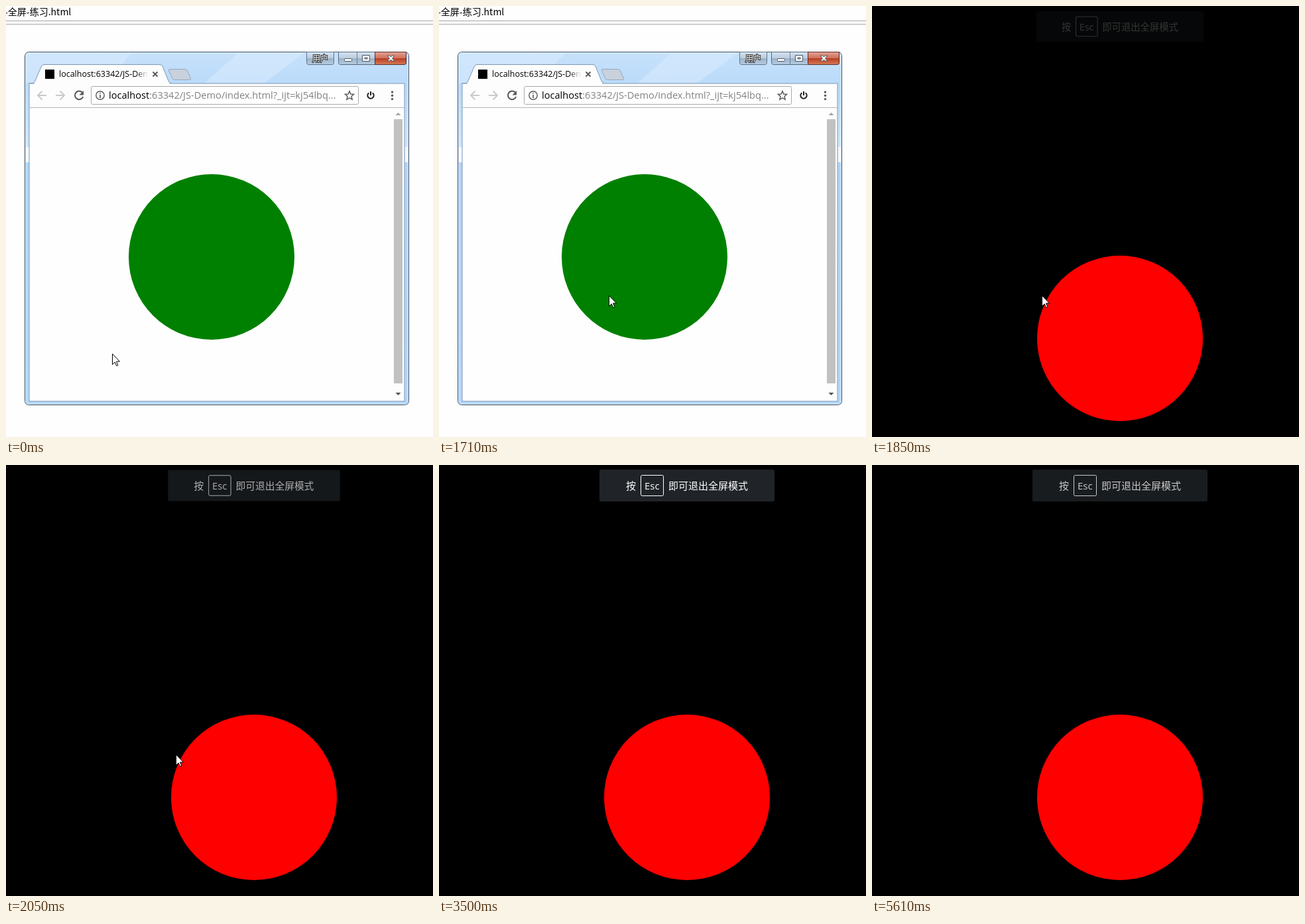
These frames come from a looping animation (644 px wide and 651 px high, 5710 ms). An HTML page:

```html
<!DOCTYPE html>
<html lang="zh">
<head>
<meta charset="utf-8">
<title>全屏</title>
<style>
  html, body { margin: 0; width: 100%; height: 100%; overflow: hidden; background: #000; }
  svg { display: block; width: 644px; height: 651px; }
  text { font-family: "Open Sans", "Noto Sans CJK SC", "Noto Sans CJK", sans-serif; white-space: pre; }
  .cjk { font-family: "Noto Sans CJK SC", "Noto Sans CJK", sans-serif; }
  .bar { fill: #fdfdfd; }
  .edge { stroke: #7d97b3; }
  .newtab { fill: #c8d1dc; stroke: #98a8ba; }
  .profile { fill: url(#button); stroke: #5f7388; }
  .bare .glass { display: none; }
  .bare .bar { fill: #f1f1f1; }
  .bare .edge { stroke: none; }
  .bare .newtab { fill: #a2a2a2; stroke: none; }
  .bare .profile { fill: url(#darkButton); stroke: #b5b5b5; }
</style>
</head>
<body>
<svg viewBox="0 0 644 651">
  <defs>
    <linearGradient id="frame" x2="0" y2="1">
      <stop stop-color="#c6e1fb"/><stop offset=".1" stop-color="#b9dafa"/>
      <stop offset=".31" stop-color="#d5e9fc"/><stop offset=".312" stop-color="#b2d5f8"/>
      <stop offset="1" stop-color="#b4d8fc"/>
    </linearGradient>
    <linearGradient id="button" x2="0" y2="1">
      <stop stop-color="#d5e3f1"/><stop offset=".48" stop-color="#bccddf"/>
      <stop offset=".5" stop-color="#9bb0c6"/><stop offset="1" stop-color="#b7cde2"/>
    </linearGradient>
    <linearGradient id="darkButton" x2="0" y2="1">
      <stop stop-color="#666"/><stop offset=".48" stop-color="#383838"/>
      <stop offset=".5" stop-color="#050505"/><stop offset="1" stop-color="#333"/>
    </linearGradient>
    <linearGradient id="close" x2="0" y2="1">
      <stop stop-color="#e3a394"/><stop offset=".48" stop-color="#cf705c"/>
      <stop offset=".5" stop-color="#b83a22"/><stop offset="1" stop-color="#d57b58"/>
    </linearGradient>
    <linearGradient id="fade">
      <stop offset=".5" stop-color="#fff"/><stop offset="1" stop-color="#fff" stop-opacity="0"/>
    </linearGradient>
    <mask id="tabFade" maskUnits="userSpaceOnUse" x="78" y="90" width="136" height="26">
      <rect x="0" y="90" width="196" height="26" fill="#fff"/>
      <rect x="178" y="90" width="36" height="26" fill="url(#fade)"/>
    </mask>
  </defs>

  <g id="desktop">
    <rect width="644" height="651" fill="#fefefe"/>
    <path d="M0 22.5H644M0 27.5H644" stroke="#a5a5a5"/>
    <text class="cjk" x="-2" y="14" font-size="14">-全屏-练习.html</text>
  </g>

  <g id="browser">
    <g class="glass">
      <rect x="28.5" y="69.5" width="579" height="533" rx="6" fill="url(#frame)" stroke="#3d4d61"/>
      <path d="M30 116V76Q30 71 35 71H190L150 116ZM300 116L350 71H450L390 116Z" fill="#d9ecfe" opacity=".6"/>
      <path d="M30 213H35V236H30ZM602 213H606V236H602Z" fill="#f4f9fe"/>
      <rect x="29.5" y="70.5" width="577" height="531" rx="5" fill="none" stroke="#e4f2ff" opacity=".8"/>
      <path d="M501.500 69.500H603.500V85.500Q603.500 88.500 600.500 88.500H504.500Q501.500 88.500 501.500 85.500Z" fill="url(#button)" stroke="#54677c"/>
      <path d="M556.500 69.500H603.500V85.500Q603.500 88.500 600.500 88.500H556.500Z" fill="url(#close)" stroke="#5b3030"/>
      <path d="M529.500 70V88" stroke="#6a7e93"/>
      <g fill="#fff" stroke="#4b5664">
        <rect x="510.500" y="79.500" width="11" height="4" rx="1"/>
        <path fill-rule="evenodd" d="M537.500 74.500H548.500V83.500H537.500ZM541 78V80H545V78Z"/>
        <path d="M575 75H578.500L580.500 77 582.500 75H586L582.500 79 586 83H582.500L580.500 81 578.500 83H575L578.500 79Z"/>
      </g>
    </g>
    <path class="profile" d="M453.500 69.500H494.500V85.500Q494.500 88.500 491.500 88.500H456.500Q453.500 88.500 453.500 85.500Z"/>
    <text class="cjk" x="462" y="84" font-size="12" fill="#fff" stroke="#333" stroke-width="2" paint-order="stroke">用户</text>

    <rect class="bar edge" x="35" y="117" width="566" height="480" stroke-width="1"/>
    <path class="bar edge" d="M35 116.500H41Q43 116 44 113L53 92Q54.500 88.500 57 88.500H232Q235 88.500 236 91L245 113Q246 116.500 249 116.500"/>
    <path class="bar" d="M43 116H246V119H43Z"/>
    <path class="newtab" d="M247 95.500H270Q272.500 95.500 273.500 98L278.500 109Q279 111.500 277 111.500H254Q252 111.500 251 109.500L245.500 98Q245 95.500 247 95.500Z"/>
    <rect x="59" y="96" width="14" height="14"/>
    <text x="80" y="107" font-size="12.5" mask="url(#tabFade)">localhost:63342/JS-Demo</text>
    <path d="M221.500 99.500L228.500 106.500M228.500 99.500L221.500 106.500" stroke="#555" stroke-width="1.8"/>

    <g fill="none" stroke="#cacaca" stroke-width="2">
      <path d="M61 135H48.500M54.500 128.500L48 135 54.500 141.500M75 135H87.500M81.500 128.500L88 135 81.500 141.500"/>
      <path d="M114.700 130.300A6.300 6.300 0 1 0 116.200 137" stroke="#555"/>
    </g>
    <path d="M117 128V134.500H110.500Z" fill="#555"/>
    <rect x="128.500" y="121.500" width="403" height="27" rx="2" fill="#fff" stroke="#a9a9a9"/>
    <circle cx="142" cy="135" r="6.200" fill="none" stroke="#555" stroke-width="1.400"/>
    <path d="M142 134V139M142 131V132.600" stroke="#555" stroke-width="1.600"/>
    <text x="155" y="140" font-size="14.6">localhost<tspan fill="#808080">:63342/JS-Demo/index.html?_ijt=kj54lbq...</tspan></text>
    <path d="M518 128.500L519.900 133 524.600 133.400 521 136.500 522.100 141.200 518 138.700 513.900 141.200 515 136.500 511.400 133.400 516.100 133Z" fill="none" stroke="#555" stroke-width="1.400"/>
    <path d="M547.300 131.200A4.700 4.700 0 1 0 552.700 131.200M550 129V135" fill="none" stroke="#222" stroke-width="2"/>
    <g fill="#555"><circle cx="582.500" cy="130" r="1.700"/><circle cx="582.500" cy="135.300" r="1.700"/><circle cx="582.500" cy="140.600" r="1.700"/></g>

    <path d="M36 153.500H601" stroke="#b5b5b5"/>
    <rect x="36" y="154" width="547" height="442" fill="#fefefe"/>
    <rect x="585" y="171" width="13" height="399" fill="#c1c1c1"/>
    <path d="M587.500 165H595.500L591.500 161Z" fill="#a3a3a3"/>
    <path d="M587.500 584H595.500L591.500 588Z" fill="#505050"/>
    <circle cx="310" cy="379" r="125" fill="#008000"/>
  </g>

  <g id="full">
    <rect width="644" height="651"/>
    <circle cx="374" cy="502" r="125" fill="#f00"/>
    <g id="notice">
      <rect x="242" y="7" width="264" height="48" rx="2" fill="#202428"/>
      <rect x="304.500" y="15.500" width="34" height="31" rx="2" fill="none" stroke="#fff"/>
      <g fill="#fff" font-size="15">
        <text class="cjk" x="282" y="37">按</text>
        <text x="310" y="37">Esc</text>
        <text class="cjk" x="346" y="37">即可退出全屏模式</text>
      </g>
    </g>
  </g>

  <g id="pointer">
    <path d="M.5.500V16.500L4.200 13 6.700 18.500 8.900 17.600 6.500 12H11.500Z" fill="#fff" stroke="#000"/>
    <g id="press" fill="none">
      <circle cx="1.500" cy="1.500" r="10" stroke="#000"/>
      <circle cx="1.500" cy="1.500" r="9" stroke="#fff"/>
    </g>
  </g>
</svg>
<script>
const LOOP = 5710;
const [desktop, browser, full, notice, pointer, press] =
  ['desktop', 'browser', 'full', 'notice', 'pointer', 'press'].map(id => document.getElementById(id));
const show = (el, on) => el.setAttribute('display', on ? 'inline' : 'none');
const within = (t, from, to) => t >= from && t < to;
const steps = (t, start, interval, count) =>
  Math.max(0, Math.min(count, Math.floor((t - start) / interval)));

function pointerAt(t) {
  if (t < 2910) {
    const p = steps(t, 839, 51, 8) / 8;
    const eased = p * p * (3 - 2 * p);
    return [160 + 96 * eased, 525 - 88 * eased];
  }
  const p = (steps(t, 2910, 49, 11) / 11) ** 1.6;
  return [255 + 100 * p, 437 + 202 * p];
}

function draw(t) {
  show(desktop, t < 1740);
  show(browser, t < 1850);
  browser.classList.toggle('bare', t >= 1740);
  show(full, t >= 1850);

  const grow = steps(t, 1860, 50, 5) / 5;
  const scale = 0.957 + 0.043 * grow;
  const fade = t < 5570 ? 1 : t < 5610 ? 0.9 : 0.78;
  notice.setAttribute('opacity', (0.2 + 0.8 * grow) * fade);
  notice.setAttribute('transform', `translate(374 31) scale(${scale}) translate(-374 -31)`);

  show(pointer, t < 3500);
  show(press, within(t, 560, 680) || within(t, 1650, 1710));
  pointer.setAttribute('transform', `translate(${pointerAt(t).map(Math.round)})`);
}

function tick() {
  draw(performance.now() % LOOP);
  requestAnimationFrame(tick);
}
tick();
</script>
</body>
</html>
```
